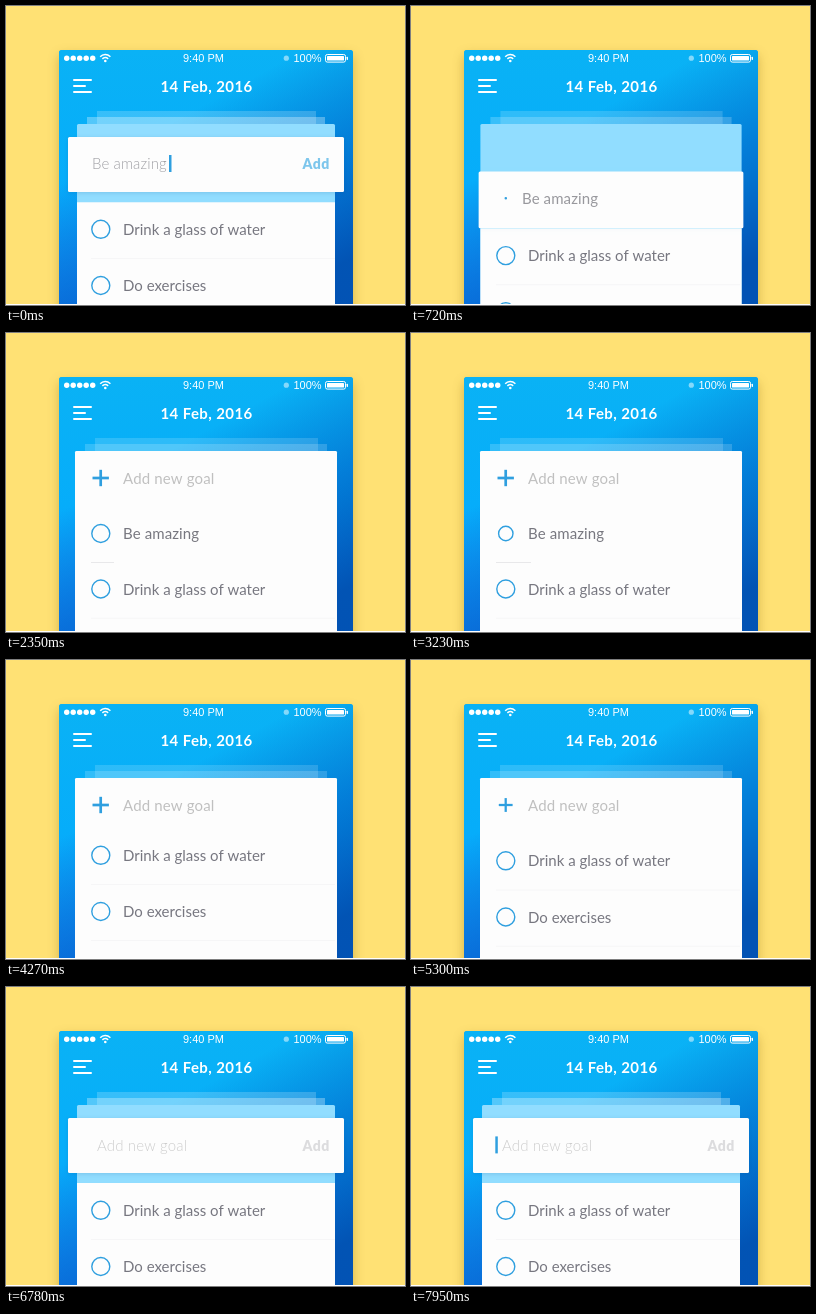
An HTML page with a canvas that plays this animation: 399 px wide and 299 px high, repeating every 8 s.

```html
<!DOCTYPE html>
<html lang="en">
<head>
<meta charset="utf-8">
<title>Daily goals</title>
<style>
html, body { margin: 0; width: 100%; height: 100%; overflow: hidden; background: #ffe174; }
canvas { display: block; width: 399px; height: 299px; }
</style>
</head>
<body>
<canvas id="stage"></canvas>
<script>
const W = 399, H = 299, LOOP = 8000;
const BLUE = '#2f9fdf', GREY = '#777780', WHITE = '#fdfdfd';
const canvas = document.getElementById('stage');
const ctx = canvas.getContext('2d');
const dpr = window.devicePixelRatio || 1;
canvas.width = W * dpr;
canvas.height = H * dpr;

const clamp = v => Math.max(0, Math.min(1, v));
const span = (t, a, b) => clamp((t - a) / (b - a));
const mix = (a, b, p) => a + (b - a) * p;
const inOut = u => u < 0.5 ? 4 * u ** 3 : 1 - 4 * (1 - u) ** 3;
const outBack = u => 1 + 2.7 * (u - 1) ** 3 + 1.7 * (u - 1) ** 2;
const dip = (t, a, b) => Math.sin(Math.PI * span(t, a, b));

function rect(x, y, w, h, fill, r = 0) {
  ctx.fillStyle = fill;
  ctx.beginPath();
  ctx.roundRect(x, y, w, h, r);
  ctx.fill();
}

function disc(x, y, r, fill) {
  ctx.fillStyle = fill;
  ctx.beginPath();
  ctx.arc(x, y, r, 0, 7);
  ctx.fill();
}

function line(x1, y1, x2, y2, color, width) {
  ctx.strokeStyle = color;
  ctx.lineWidth = width;
  ctx.beginPath();
  ctx.moveTo(x1, y1);
  ctx.lineTo(x2, y2);
  ctx.stroke();
}

function text(str, x, y, color, { size = 15, weight = 400, family = 'Lato', gap = 0 } = {}) {
  ctx.font = `${weight} ${size}px ${family}, sans-serif`;
  ctx.letterSpacing = gap + 'px';
  ctx.fillStyle = color;
  ctx.fillText(str, x, y);
}

function faded(alpha, draw) {
  if (alpha <= 0) return;
  ctx.save();
  ctx.globalAlpha *= alpha;
  draw();
  ctx.restore();
}

function gradient(x1, y1, x2, y2, ...stops) {
  const g = ctx.createLinearGradient(x1, y1, x2, y2);
  stops.forEach((c, i) => g.addColorStop(i / (stops.length - 1), c));
  return g;
}

function phone() {
  rect(0, 0, W, H, '#ffe174');
  ctx.save();
  ctx.shadowColor = 'rgba(130, 90, 0, .35)';
  ctx.shadowBlur = 12 * dpr;
  ctx.shadowOffsetY = 5 * dpr;
  rect(53, 44, 294, 270, '#0aa5f5', 3);
  ctx.restore();
  rect(53, 44, 294, 270, gradient(0, 44, 0, 299, '#0ab2f5', '#06adfa', '#1590ff'), 3);
  rect(53, 44, 294, 270, gradient(250, 70, 350, 250, 'rgba(0,76,176,0)', 'rgba(0,86,190,.55)', 'rgba(0,76,172,.9)'), 3);
}

function statusBar() {
  for (let i = 0; i < 5; i++) disc(60.7 + i * 6.5, 52.2, 2.7, '#fff');
  ctx.strokeStyle = '#fff';
  ctx.lineWidth = 1.5;
  for (const r of [4, 7]) {
    ctx.beginPath();
    ctx.arc(99.3, 55.6, r, -Math.PI * 0.76, -Math.PI * 0.24);
    ctx.stroke();
  }
  disc(99.3, 55, 1.3, '#fff');
  const small = { size: 11, family: 'Liberation Sans' };
  text('9:40 PM', 177, 56, '#fff', small);
  text('100%', 287.5, 56, '#fff', small);
  disc(280.3, 52.2, 2.6, 'rgba(255,255,255,.5)');
  ctx.lineWidth = 1;
  ctx.strokeStyle = '#fff';
  ctx.beginPath();
  ctx.roundRect(319.5, 48.5, 20, 7.6, 1.8);
  ctx.stroke();
  rect(321, 50, 17, 4.6, '#fff', 0.6);
  rect(340.6, 50.7, 1.4, 3.2, '#fff', 0.6);
}

function header() {
  ctx.lineCap = 'round';
  [[74, 85], [80, 79], [86, 85]].forEach(([y, x]) => line(68, y, x, y, '#fff', 2));
  ctx.lineCap = 'butt';
  text('14 Feb, 2016', 154.5, 86, '#fff', { weight: 700, gap: 0.4 });
}

function ring(y, scale = 1, done = 0) {
  ctx.strokeStyle = BLUE;
  ctx.lineWidth = 1.4;
  ctx.beginPath();
  ctx.arc(94.8, y - 0.5, 9 * scale, 0, 7);
  ctx.stroke();
  faded(done, () => {
    disc(94.8, y - 0.5, 9 * scale, BLUE);
    ctx.strokeStyle = '#fff';
    ctx.beginPath();
    ctx.moveTo(90.5, y);
    ctx.lineTo(93.5, y + 3);
    ctx.lineTo(99, y - 3.5);
    ctx.stroke();
  });
}

function row(label, y) {
  ring(y);
  text(label, 117, y + 5.1, GREY);
  line(85, y + 28.7, 329, y + 28.7, '#f6f6f7', 1);
}

// Translucent sheets stacked behind the list
function stack(open) {
  const left = mix(69, 71, open), right = mix(331, 329, open);
  rect(left + 20, 105, right - left - 39, 14, `rgba(255,255,255,${mix(0.15, 0.19, open)})`);
  rect(left + 10, 111, right - left - 20, 8, `rgba(255,255,255,${mix(0.17, 0.3, open)})`);
  rect(left, 118, right - left, 190, '#91ddff', 1.5);
  return [left, right];
}

function card(open, top) {
  const left = mix(69, 62, open), right = mix(331, 338, open);
  ctx.save();
  ctx.shadowColor = `rgba(0, 70, 130, ${0.16 * open})`;
  ctx.shadowBlur = 4 * dpr;
  ctx.shadowOffsetY = dpr;
  rect(left, top, right - left, mix(57, 55, open), WHITE, 1.5);
  ctx.restore();
}

function cursor(x, y) {
  rect(x - 1.2, y - 8.5, 2.5, 17, BLUE);
}

// Plus sign whose arms close into the text cursor
function plus(x, y, open, scale) {
  const turn = clamp(open / 0.87) * Math.PI / 2;
  ctx.save();
  ctx.translate(x, y);
  ctx.scale(scale, scale);
  for (const a of [-0.15 * Math.sin(turn * 2), turn - Math.PI / 2]) {
    ctx.save();
    ctx.rotate(a);
    rect(-1.35, -8.2, 2.7, 16.4, BLUE);
    ctx.restore();
  }
  ctx.restore();
}

function submitCard(t, p) {
  const top = mix(131, 174, p), y = top + 27.1;
  card(1 - p, top);
  faded(1 - span(t, 150, 550), () => {
    text('Add', 296.5, y + 5, '#7dc6ec', { size: 14, weight: 900, gap: 0.5 });
    cursor(164.2, y - 0.6);
  });
  const shade = Math.round(mix(160, 132, span(t, 500, 1250)));
  text('Be amazing', mix(86, 117, p), y + 5.2, `rgb(${shade},${shade},${shade + 5})`,
    { weight: t < 700 ? 300 : 400, gap: 0.1 });
  const grow = span(t, 700, 1320);
  if (grow > 0) ring(y, grow * (2 - grow) * 0.97);
}

function newItem(t) {
  const y = 201;
  faded(1 - span(t, 3750, 4000), () => {
    const grow = mix(0.92, 1, span(t, 1160, 1400));
    ring(y, grow - 0.2 * dip(t, 3000, 3460), span(t, 3450, 3600));
    const shade = mix(132, 119, span(t, 1160, 1700));
    text('Be amazing', 117, y + 5.2, `rgb(${shade},${shade},${shade + 8})`, { gap: 0.1 });
    const reach = 35 * span(t, 660, 3230);
    if (t > 1300) line(85, 229.5, 85 + reach, 229.5, '#e8e8ea', 1);
  });
}

function inputCard(t, open) {
  const top = mix(118, 131, open), y = top + 27.7;
  faded(span(t, 1250, 1750), () => card(open, top));
  const show = span(t, 1600, 2050);
  faded(show, () => {
    const shade = Math.round(mix(192, 205, open));
    text('Add new goal', mix(117, 91, open), y + 5.5, `rgb(${shade},${shade},${shade})`,
      { weight: open > 0.5 ? 300 : 400, gap: 0.15 });
    const x = mix(94.7, 85.5, open);
    if (open < 1) plus(x, y - 0.7, open, outBack(show) - 0.2 * dip(t, 5180, 5600));
    else if (t < 6500 || (t - 7950 + 5800) % 580 < 290) cursor(x, y - 0.8);
  });
  faded(span(open, 0.5, 1), () =>
    text('Add', 296.5, y + 5, '#dcdcde', { size: 14, weight: 900, gap: 0.5 }));
}

function draw(t) {
  ctx.setTransform(dpr, 0, 0, dpr, 0, 0);
  phone();
  statusBar();
  header();

  const drop = inOut(span(t, 150, 1050));
  const adding = t < 1250;
  const open = adding ? 1 - drop : inOut(span(t, 5450, 6420));
  const lift = outBack(span(t, 3750, 4650));
  const rowY = adding ? mix(223.8, 256.5, drop) : mix(256.5, 201.3, lift) + 22.5 * open;
  const [left, right] = stack(open);

  const listTop = adding ? rowY - 27.5 : 174 + 22 * open;
  rect(left, listTop, right - left, H - listTop, WHITE);
  row('Drink a glass of water', rowY);
  row('Do exercises', rowY + 56.2);

  if (adding) {
    submitCard(t, drop);
  } else {
    if (t < 4000) newItem(t);
    inputCard(t, open);
  }
  rect(0, H - 1, W, 1, '#fff');
}

function tick() {
  draw(performance.now() % LOOP);
  requestAnimationFrame(tick);
}
tick();
</script>
</body>
</html>
```
